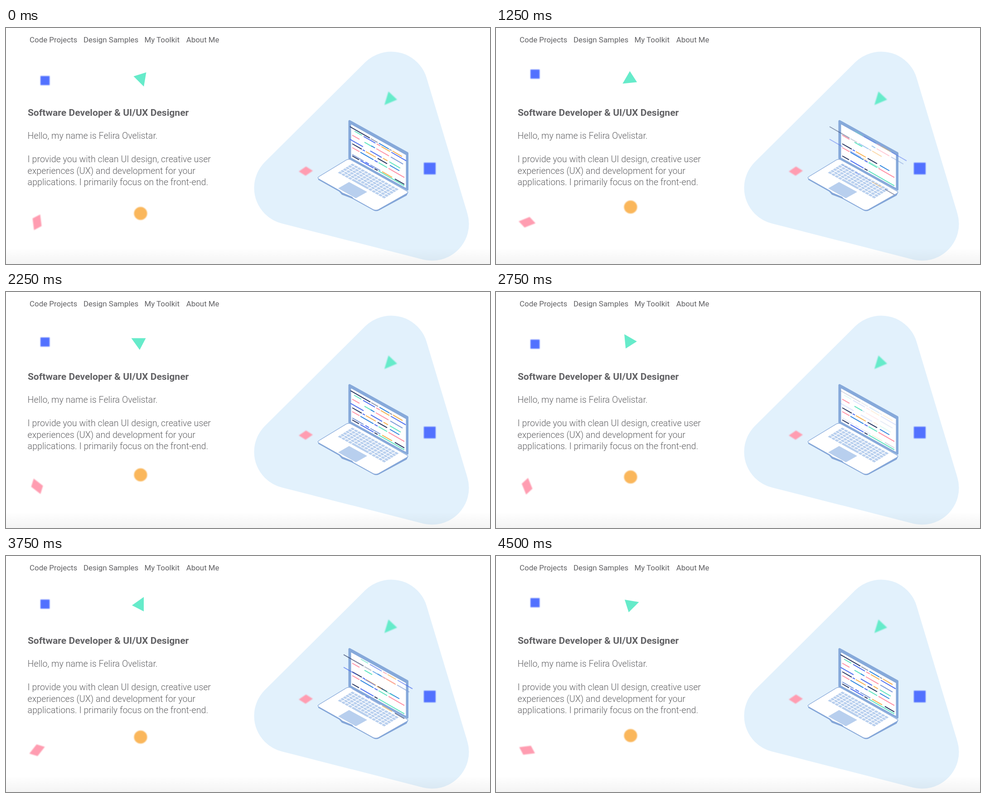
Write an HTML page that moves like this. It is 1068 px wide and 524 px high and loops after 4750 ms.

```html
<!DOCTYPE html>
<html lang="en">
<head>
<meta charset="utf-8">
<title>Portfolio</title>
<style>
  html, body { margin: 0; width: 100%; height: 100%; overflow: hidden; background: #fff; }
  svg { display: block; width: 1068px; height: 524px; }
  text { font-family: Roboto, sans-serif; fill: #626265; }
  .nav { font-size: 16.9px; }
  .head { font-size: 21.1px; font-weight: 700; }
  .body { font-size: 19.66px; font-weight: 300; }
  .soft { filter: blur(.9px); }
  .blue { fill: #5271ff; }
  .green { fill: #66ebca; }
  .pink { fill: #ff9db1; }
  .orange { fill: #fab75c; }
  .code { fill: none; stroke-width: 2; }
</style>
</head>
<body>
<svg viewBox="0 0 1068 524">
  <defs>
    <linearGradient id="shade" x1="0" y1="0" x2="0" y2="1">
      <stop offset="0" stop-color="#000" stop-opacity="0"/>
      <stop offset="1" stop-color="#000" stop-opacity=".045"/>
    </linearGradient>
  </defs>

  <path d="M850 134L629 355L940 435Z" fill="#e2f1fc" stroke="#e2f1fc" stroke-width="163" stroke-linejoin="round"/>
  <rect y="488" width="1068" height="36" fill="url(#shade)"/>

  <g class="nav">
    <text x="52" y="32">Code Projects</text>
    <text x="171" y="32">Design Samples</text>
    <text x="305.5" y="32">My Toolkit</text>
    <text x="397.7" y="32">About Me</text>
  </g>
  <text class="head" x="47.9" y="195">Software Developer &amp; UI/UX Designer</text>
  <g class="body">
    <text x="47.6" y="246">Hello, my name is Felira Ovelistar.</text>
    <text x="47.6" y="298">I provide you with clean UI design, creative user</text>
    <text x="47.6" y="323.5">experiences (UX) and development for your</text>
    <text x="47.6" y="349">applications. I primarily focus on the front-end.</text>
  </g>

  <!-- laptop -->
  <g stroke-linejoin="round">
    <path d="M689 333V337L735 363L741 370L762 378L766 380L811 405Q817 408 823 405L884 372L887 366Z" fill="#84a6d8"/>
    <path d="M692 329L751 293Q757 290 763 293L886 363Q888 365 885 367L822 403Q816 406 810 403L767 379L763 375L742 366L736 361L690 335Q686 332 692 329Z"
      fill="#fff" stroke="#84a6d8" stroke-width="1.3"/>
    <path d="M757 342L797 364L772 378L733 356Z" fill="#b8cfee"/>
    <g id="keys" fill="#b8cfee"/>
    <path d="M758 207L885.5 278V358.5L758 289Z" fill="#86a9da" stroke="#86a9da" stroke-width="5"/>
    <path d="M761.5 214L882.5 282V355L761.5 288Z" fill="#fff"/>
  </g>
  <g id="fixed" class="code"/>
  <g id="left" class="code"/>
  <g id="right" class="code"/>
  <g id="below" class="code"/>

  <g class="soft">
    <path class="green" d="M844 141L863 159L835 171Z"/>
    <rect class="blue" x="922" y="299" width="26" height="26"/>
    <path class="pink" d="M646 318.5L662 307.5L677 317L661 328Z"/>
    <rect class="blue" id="square" x="76" width="20.3" height="20.3"/>
    <circle class="orange" id="ball" cx="297" r="14.5"/>
    <path class="pink" id="rhomb" d=""/>
  </g>
  <path class="green" id="tri" d="M-8 -12.5L18 1L-8 19.5Z"/>
</svg>
<script>
const LOOP = 4750, STEP = 250, RAD = Math.PI / 180;
const SLOPE = 0.577;
const CYCLE = 2190, ENTER = 1600, HOLD = 1700, REACH = 45;
const $ = id => document.getElementById(id);
const ink = {
  n: '#26345f', b: '#4a6cf0', c: '#2f86e0', s: '#7d9bd8',
  g: '#5fe3bf', p: '#ff8fa3', o: '#f7b04f', y: '#8f98ae'
};

// One slanted row of code: y is its height at x = 764, parts are [colour, from, to]
function row(id, y, ...parts) {
  const at = x => `${x} ${y + (x - 764) * SLOPE}`;
  for (const [c, a, b] of parts)
    $(id).innerHTML += `<path d="M${at(a)}L${at(b)}" stroke="${ink[c]}"/>`;
}

row('fixed', 238, ['p', 764, 780], ['g', 791, 808]);
row('fixed', 257, ['n', 764, 785], ['b', 787, 792], ['o', 794, 816], ['n', 820, 841], ['c', 847, 868]);
row('fixed', 265.5, ['p', 764, 780], ['c', 782, 811], ['b', 813, 820], ['g', 822, 841], ['p', 844, 879]);
row('fixed', 284, ['n', 764, 779], ['b', 782, 811], ['n', 813, 820], ['g', 822, 879]);

row('left', 221.3, ['n', 760, 804], ['y', 806, 821], ['c', 824, 846], ['y', 847, 852], ['o', 854, 875]);
row('left', 249.3, ['b', 760, 789], ['b', 805, 830], ['o', 833, 843], ['g', 847, 871]);
row('right', 226.7, ['g', 768, 784], ['b', 788, 814], ['p', 817, 825], ['o', 827, 846], ['b', 849, 882]);
row('right', 238, ['c', 805, 813], ['p', 816, 844], ['s', 848, 875]);
row('below', 279.7, ['s', 764, 789], ['b', 793, 801], ['s', 804, 826], ['o', 830, 852], ['n', 858, 879]);

// Keyboard: rows and columns on a slanted grid
const ROWS = 6, COLS = 14;
const spot = (u, v) => `${764 + 104 * u - 33 * v} ${301 + 58 * u + 21 * v}`;
for (let r = 0; r < ROWS; r++) {
  for (let c = 0; c < COLS; c++) {
    if (r === ROWS - 1 && c > 4 && c < 9) continue;
    const wide = r === ROWS - 1 && c === 4 ? 5 : 1;
    const u = c / COLS, w = (c + wide - 0.2) / COLS;
    const v = r / ROWS, z = (r + 0.78) / ROWS;
    $('keys').innerHTML += `<path d="M${spot(u, v)}L${spot(w, v)}L${spot(w, z)}L${spot(u, z)}Z"/>`;
  }
}

function float(t) {
  const a = t / 3000 * 2 * Math.PI;
  return 6.54 * Math.cos(a) - 2.1 * Math.sin(a) + 0.62 * Math.cos(2 * a) + 0.9 * Math.sin(2 * a);
}

function slide(t) {
  const phase = (t + 1540) % CYCLE;
  const x = Math.min(1, phase / ENTER);
  const p = Math.min(1, x + 0.1 * Math.sin(Math.PI * x));
  const fade = phase > HOLD ? (CYCLE - phase) / (CYCLE - HOLD) : 1;
  return { d: REACH * (1 - p), alpha: p * fade };
}

function place(id, x, y, alpha) {
  $(id).setAttribute('transform', `translate(${x} ${y})`);
  $(id).setAttribute('opacity', alpha);
}

const polar = (r, deg) => [r * Math.cos(deg * RAD), r * Math.sin(deg * RAD)];

function draw(t) {
  const turn = t * 0.06;
  const lift = float(t);
  $('square').setAttribute('y', 99.4 + lift);
  $('ball').setAttribute('cy', 404.6 + lift);

  const [ax, ay] = polar(26, 83 + turn), [bx, by] = polar(19, 152 + turn);
  $('rhomb').setAttribute('d',
    `M${68.6 - (ax + bx) / 2} ${431.3 - (ay + by) / 2}l${ax} ${ay}l${bx} ${by}l${-ax} ${-ay}Z`);
  $('tri').setAttribute('transform', `translate(296 110.5) rotate(${turn - 45})`);

  const { d, alpha } = slide(t);
  place('left', -d, 0, alpha);
  place('right', d, 0, alpha);
  place('below', 0, d, alpha);
}

function tick() {
  const t = performance.now() % LOOP;
  draw(Math.floor(t / STEP) * STEP);
  requestAnimationFrame(tick);
}
tick();
</script>
</body>
</html>
```
